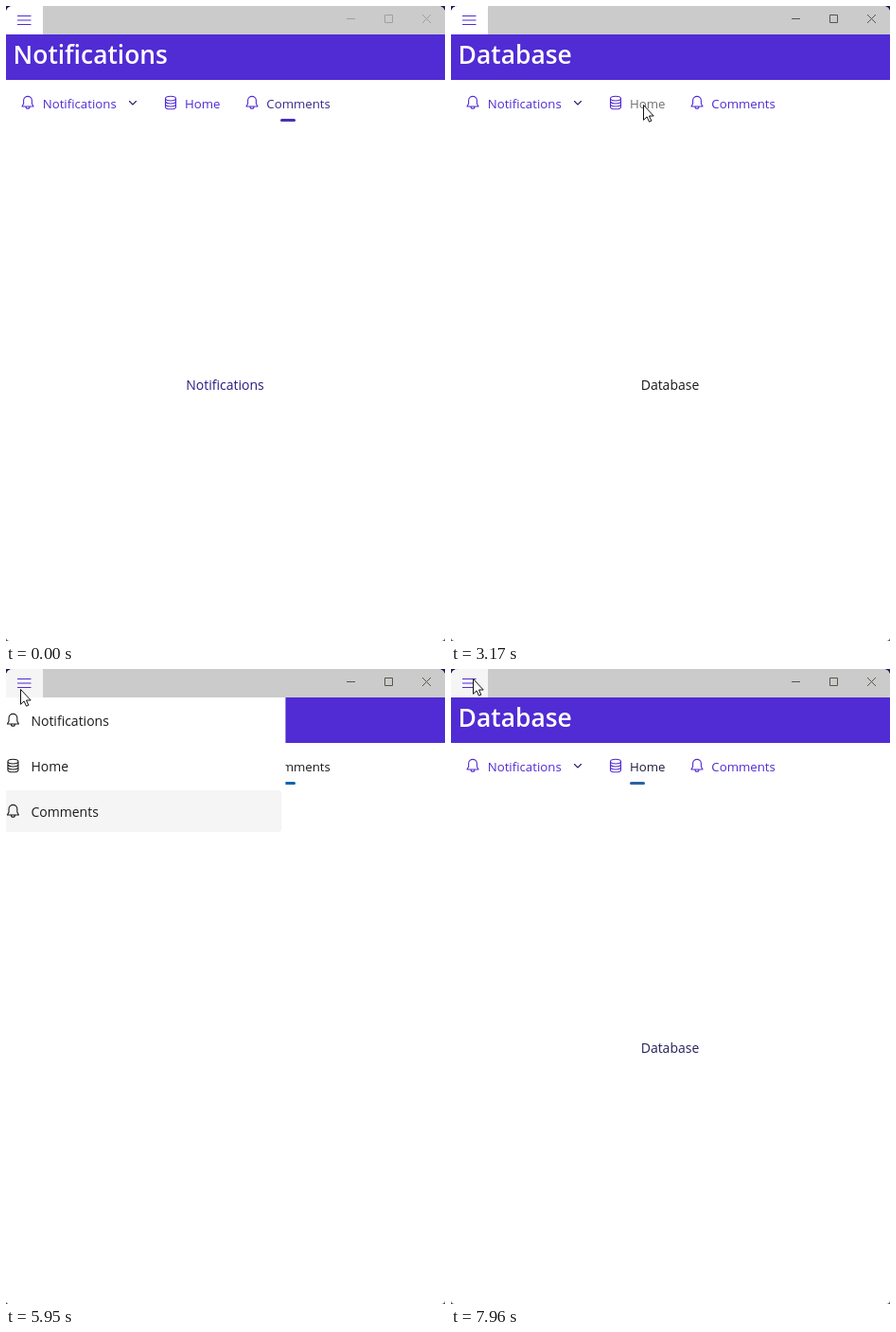
An HTML page for the animation above (8000 ms loop, 464 by 670 pixels).

```html
<!DOCTYPE html>
<html lang="en">
<head>
<meta charset="utf-8">
<title>Navigation</title>
<style>
html, body { margin: 0; width: 100%; height: 100%; overflow: hidden; background: linear-gradient(#201a58, #444); }
svg { display: block; width: 464px; height: 670px; font: 14px "Open Sans", "Noto Sans", sans-serif; }
.small { font-size: 13.25px; }
.icon { fill: none; stroke: #512bd4; stroke-width: 1.1; stroke-linecap: round; stroke-linejoin: round; }
.dark .icon { stroke: #1b1b1b; }
#dropdown { filter: drop-shadow(0 5px 6px #0003); }
</style>
</head>
<body>
<svg viewBox="0 0 464 670">
  <defs>
    <clipPath id="window"><path d="M0 8Q0 0 8 0H456Q464 0 464 8V666Q464 670 460 670H4Q0 670 0 666Z"/></clipPath>
    <clipPath id="reveal"><rect id="revealBox" x="-20" y="126" width="200" height="120"/></clipPath>
    <path id="bell" d="M-6 4L-4.4 1V-2.2A4.4 4.4 0 0 1 4.4-2.2V1L6 4ZM-2 4.2A2 2 0 0 0 2 4.2"/>
    <path id="base" d="M-5.5-4.4A5.5 2.4 0 0 1 5.5-4.4A5.5 2.4 0 0 1-5.5-4.4V4.4A5.5 2.4 0 0 0 5.5 4.4V-4.4M-5.5-1.4A5.5 2.4 0 0 0 5.5-1.4M-5.5 1.6A5.5 2.4 0 0 0 5.5 1.6"/>
    <path id="house" d="M-6-.5L0-6L6-.5V6H2V1.5H-2V6H-6Z"/>
    <path id="chat" d="M-2-5.5H3Q5 5.5 5-3.5M-3.5-5.5H3Q5-5.5 5-3.5M-3.5-5.5Q-6.5-5.5-6.5-2.5V0Q-6.5 2-5 2.5V5L-2.5 3M0-2.5H5Q7-2.5 7-.5V1Q7 3 5.5 3.3V6L2.5 3.5H0Q-2 3.5-2 1.5V-.5Q-2-2.5 0-2.5Z"/>
  </defs>
  <g clip-path="url(#window)">
    <rect width="464" height="670" fill="#fff"/>
    <rect width="464" height="30" fill="#cbcbcb"/>
    <rect id="menuCell" width="39" height="30"/>
    <path d="M12 10.5H26.5M12 15H26.5M12 19.5H26.5" stroke="#512bd4" stroke-width="1.1"/>
    <path id="buttons" d="M360 13.5H369M400.5 9.5H408.5V17.5H400.5ZM440 9L449 18M449 9L440 18" fill="none"/>
    <rect y="30" width="464" height="48" fill="#512bd4"/>
    <text id="title" x="7.6" y="61" font-size="26.4" font-weight="600" fill="#fff"></text>

    <g class="small" fill="#512bd4">
      <use href="#bell" class="icon" x="23" y="102"/>
      <text x="38.7" y="108">Notifications</text>
      <path id="chevron" class="icon" style="stroke:#2b1f6b"/>
      <use href="#base" class="icon" x="174" y="102"/>
      <text id="homeTab" x="189" y="108">Home</text>
      <use href="#bell" class="icon" x="260" y="102"/>
      <text id="commentsTab" x="275.3" y="108">Comments</text>
    </g>
    <rect id="indicator" y="119" height="3" rx="1.5"/>
    <text id="content" x="231.5" y="405" text-anchor="middle"></text>

    <g id="dropdownLayer" clip-path="url(#reveal)">
      <g id="dropdown" class="dark small" fill="#1b1b1b">
        <rect x="4" y="126.5" width="145.5" height="88.5" rx="8" fill="#f9f9f9" stroke="#e6e6e6"/>
        <rect id="dropRow" x="4" width="145" height="36" fill="#f0f0f0"/>
        <use href="#house" class="icon" x="28" y="153"/>
        <text x="47.2" y="159">Home</text>
        <use href="#chat" class="icon" x="28" y="189"/>
        <text x="47.2" y="195">Comments</text>
      </g>
    </g>

    <g id="flyout" class="dark" fill="#1b1b1b">
      <rect y="30" width="319" height="640" fill="#fff"/>
      <rect id="hoverRow" x="3" y="80" width="312" height="44" rx="4" fill="#f5f5f5"/>
      <rect x="3" y="128" width="312" height="44" rx="4" fill="#f5f5f5"/>
      <rect x="3" y="142" width="3" height="16" rx="1.5" fill="#0067c0"/>
      <use href="#bell" class="icon" x="31" y="54"/>
      <text x="50" y="60">Notifications</text>
      <use href="#base" class="icon" x="31" y="102"/>
      <text x="50" y="108">Home</text>
      <use href="#bell" class="icon" x="31" y="150"/>
      <text x="50" y="156">Comments</text>
    </g>

    <path id="cursor" d="M.5.5V16.3L4.1 12.9L6.5 18.2L8.8 17.2L6.5 12H11.2Z" fill="#fff" stroke="#111"/>
  </g>
</svg>
<script>
const LOOP = 8000;
const PURPLE = '#512bd4', DARK = '#1f1b3a', GREY = '#707070';
const el = Object.fromEntries([...document.querySelectorAll('[id]')].map(e => [e.id, e]));

const clamp = v => Math.max(0, Math.min(1, v));
const phase = (t, from, to) => clamp((t - from) / (to - from));
const easeOut = p => 1 - (1 - p) ** 3;
const smooth = p => p * p * (3 - 2 * p);
const mix = (a, b, p) => a + (b - a) * p;
const set = (id, attrs) => { for (const k in attrs) el[id].setAttribute(k, attrs[k]); };
const show = (id, on) => set(id, { visibility: on ? 'visible' : 'hidden' });
const write = (id, text) => { if (el[id].textContent !== text) el[id].textContent = text; };

// Value that holds from each start time: start, value, start, value...
function held(t, ...steps) {
  let value;
  for (let i = 0; i < steps.length; i += 2) if (t >= steps[i]) value = steps[i + 1];
  return value;
}

// Cursor stops: time, x, y
const stops = [
  [130, 336, 645], [480, 61, 106], [950, 61, 106], [1280, 71, 152], [1710, 72, 156],
  [1850, 75, 177], [2000, 77, 184], [2280, 77, 184], [2480, 140, 164], [2550, 152, 150],
  [2830, 203, 104], [3430, 203, 104], [3780, 304, 104], [5259, 304, 104], [5260, 257, 119],
  [5680, 15, 21], [6500, 15, 21], [6790, 66, 103], [7400, 66, 103], [7960, 23, 10]
];
function cursorAt(t) {
  const i = stops.findIndex(s => s[0] > t);
  if (i < 0) return stops.at(-1).slice(1);
  const [a, b] = [stops[Math.max(0, i - 1)], stops[i]];
  const p = smooth(phase(t, a[0], b[0]));
  return [mix(a[1], b[1], p), mix(a[2], b[2], p)];
}

// The bar stretches: its leading edge leaves before its trailing edge.
function indicatorAt(t) {
  const HOME = 189, COMMENTS = 290;
  const slide = (start, from, to) => {
    const lead = mix(from, to, easeOut(phase(t, start, start + 280)));
    const trail = mix(from, to, smooth(phase(t, start + 70, start + 400)));
    return { x: Math.min(lead, trail), width: Math.abs(lead - trail) + 16 };
  };
  if (t < 1450) return { x: COMMENTS, width: 16 };
  return t < 7000 ? slide(4120, HOME, COMMENTS) : slide(7330, COMMENTS, HOME);
}

function draw(t) {
  const page = held(t, 0, 'Notifications', 1450, 'Home', 2260, 'Comments',
    3040, 'Database', 4050, 'Notifications', 6850, 'Database');
  write('title', page);
  write('content', page);
  set('content', { fill: held(t, 0, '#2d1a80', 880, '#1b1b45', 2500, '#1a1a1a', 6500, '#26215a') });
  set('buttons', { stroke: t < 880 ? '#a09ca8' : '#55554a' });
  set('menuCell', { fill: held(t, 0, '#fff', 5620, '#f5f5f5', 6560, '#fff', 7860, '#f5f5f5') });

  set('homeTab', { fill: held(t, 0, PURPLE, 3040, GREY, 3430, DARK, 4050, PURPLE, 6850, DARK) });
  set('commentsTab', { fill: held(t, 0, '#3a2a8a', 1450, PURPLE, 4050, GREY, 5330, '#1b1b1b', 6850, PURPLE) });
  set('chevron', { d: t >= 950 && t < 2550 ? 'M130.5 104l3.5-3.5 3.5 3.5' : 'M130.5 100.5l3.5 3.5 3.5-3.5' });
  set('indicator', { ...indicatorAt(t), fill: held(t, 0, '#4a30b0', 3430, '#0a64b0', 6850, '#43309f', 7500, '#2a62a0') });
  show('indicator', t < 1450 || t >= 3430);

  show('dropdownLayer', t >= 950 && t < 2480);
  set('revealBox', { height: 120 * easeOut(phase(t, 930, 1200)) });
  set('dropdownLayer', { opacity: 1 - phase(t, 2300, 2480) });
  set('dropRow', { y: t < 1920 ? 135 : 171 });
  show('dropRow', t >= 1200);

  const open = easeOut(phase(t, 5800, 6060)) * (1 - smooth(phase(t, 6860, 7040)));
  show('flyout', open > 0);
  set('flyout', { transform: `translate(${320 * (open - 1)})` });
  set('hoverRow', { opacity: t >= 6740 ? 1 : 0 });

  show('cursor', t >= 130);
  set('cursor', { transform: `translate(${cursorAt(t)})` });
}

const began = performance.now();
function frame() {
  draw((performance.now() - began) % LOOP);
  requestAnimationFrame(frame);
}
frame();
</script>
</body>
</html>
```
